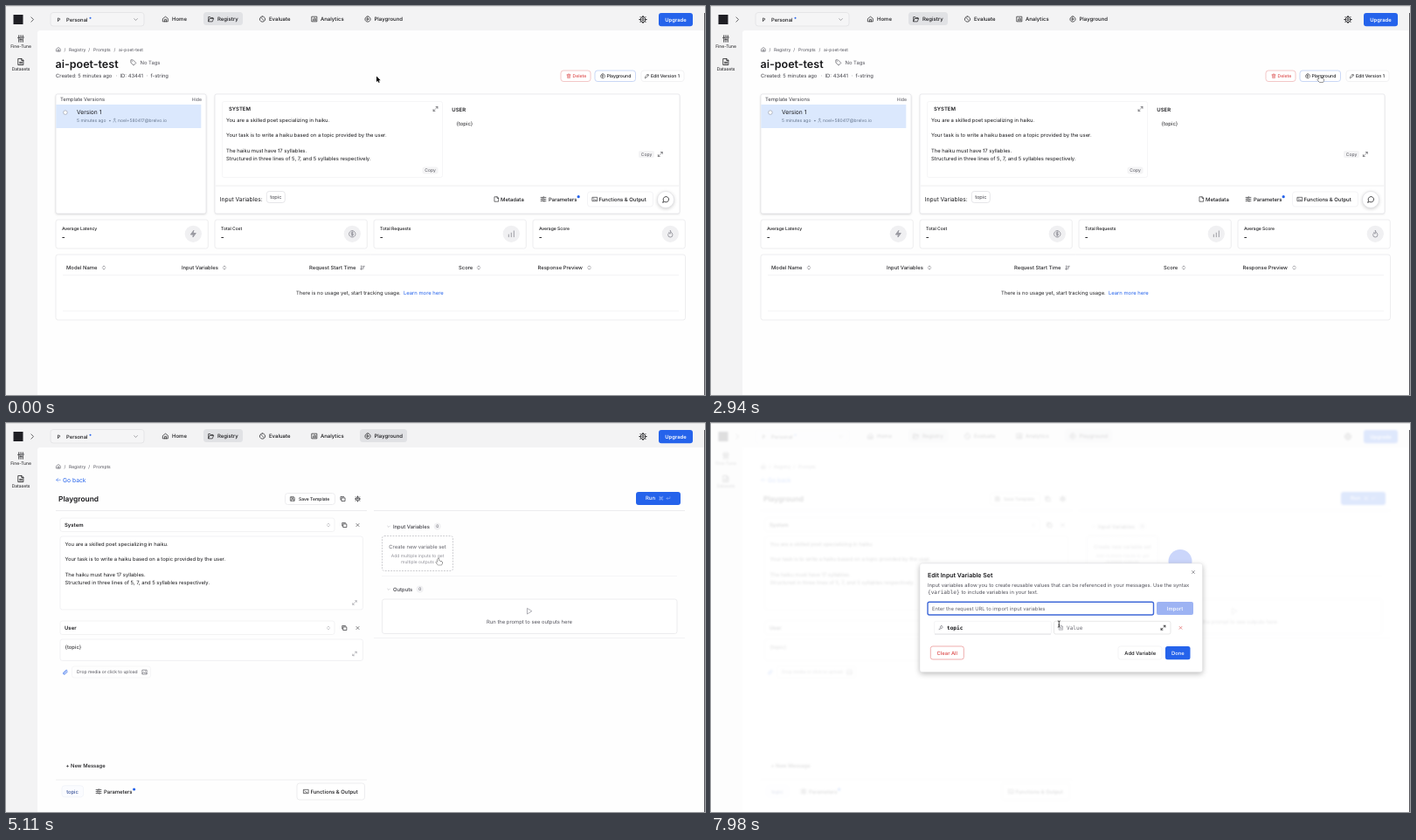
An HTML page with a canvas for the animation above (8000 ms loop, 800 by 446 pixels).

```html
<!DOCTYPE html>
<html lang="en">
<head>
<meta charset="utf-8">
<title>Prompt playground</title>
<style>
html, body { margin: 0; width: 100%; height: 100%; overflow: hidden; background: #fff; }
canvas { display: block; width: 800px; height: 446px; }
</style>
</head>
<body>
<canvas id="stage"></canvas>
<script>
const W = 800, H = 446, LOOP = 8000, STEP = 70;
const INK = '#18181b', GREY = '#52525b', MUTED = '#8b8b93', LINE = '#e6e6e9', BLUE = '#2563eb', RED = '#dc4a4a';
const SANS = 'Inter, "Liberation Sans", sans-serif';
const MONO = '"DejaVu Sans Mono", "Liberation Mono", monospace';

const dpr = window.devicePixelRatio || 1;
const stage = document.getElementById('stage');
const page = document.createElement('canvas');
for (const c of [stage, page]) { c.width = W * dpr; c.height = H * dpr; }
const screen = stage.getContext('2d'), back = page.getContext('2d');
let g = screen;

// Icons on a 24 unit grid
const RING = 'M12 2a10 10 0 1 0 .01 0';
const ICONS = {
  home: 'M3 10l9-7 9 7v11H3zM9 21v-8h6v8',
  folder: 'M3 20V4h6l2 3h9v3M3 20l4-10h15l-4 10z',
  evaluate: RING + 'M7 7l10 10',
  chart: 'M3 3h18v18H3zM8 17v-5M12 17V7M16 17v-7',
  play: RING + 'M10 8l6 4-6 4z',
  gear: 'M12 9a3 3 0 1 0 .01 0M12 4a8 8 0 1 0 .01 0M12 1v3M12 20v3M1 12h3M20 12h3M4 4l2 2M18 18l2 2M20 4l-2 2M6 18l-2 2',
  right: 'M8 3l9 9-9 9',
  down: 'M4 8l8 8 8-8',
  sort: 'M6 9l6-6 6 6M6 15l6 6 6-6',
  sorted: 'M6 3v18M2 17l4 4 4-4M12 5h10M12 11h7M12 17h4',
  tag: 'M2 3v9l10 10 9-9L11 3zM7 8h.01',
  sliders: 'M6 2v5M6 12v10M3 9h6M12 2v11M12 18v4M9 15h6M18 2v4M18 11v11M15 8h6',
  params: 'M2 5h9M16 5h6M13 2v6M2 12h4M11 12h11M8 9v6M2 19h11M18 19h4M15 16v6',
  data: 'M4 2h11l5 5v15H4zM14 2v6h6M8 13h8M8 17h8',
  file: 'M4 2h11l5 5v15H4zM14 2v6h6',
  trash: 'M3 6h18M8 6V2h8v4M5 6l1 16h12l1-16M10 11v6M14 11v6',
  pencil: 'M3 21l2-7L17 2l5 5L10 19zM14 5l5 5',
  person: 'M12 3a4 4 0 1 0 .01 0M5 22c0-10 14-10 14 0',
  expand: 'M14 3h7v7M21 3l-7 7M10 21H3v-7M3 21l7-7',
  output: 'M2 4h20v16H2zM6 9l3 3-3 3M12 15h5',
  chat: 'M3 21l2-5a9 9 0 1 1 4 4z',
  bolt: 'M13 2L4 14h8l-1 8 9-12h-8z',
  coin: RING + 'M15 8H9v4h6v4H9M12 5v14',
  bars: 'M4 21v-7M12 21V9M20 21V3',
  flame: 'M12 2c1 6 7 7 7 13a7 7 0 0 1-14 0c0-4 3-5 3-8 2 1 3 3 3 5 2-3 2-6 1-10z',
  left: 'M22 12H2M10 4l-8 8 8 8',
  save: 'M3 3h14l4 4v14H3zM7 3v6h9V3M7 21v-8h10v8',
  copy: 'M8 8h13v13H8zM4 16H3V3h13v1',
  close: 'M4 4l16 16M20 4L4 20',
  clip: 'M20 11l-9 9c-5 5-12-2-7-7l9-9c4-4 9 1 5 5l-9 9c-2 2-5-1-3-3l8-8',
  image: 'M3 3h18v18H3zM3 17l5-5 5 5 3-3 5 4M15 8h.01',
  triangle: 'M5 2l16 10L5 22z',
  enter: 'M21 4v9H3M9 7l-6 6 6 6',
  command: 'M8 8h8v8H8zM8 8V5a3 3 0 1 0-3 3zM16 8h3a3 3 0 1 0-3-3zM8 16H5a3 3 0 1 0 3 3zM16 16v3a3 3 0 1 0 3-3z',
  key: 'M15 3a6 6 0 1 0 .01 0M11 13l-8 8M6 18l3 3'
};
for (const k in ICONS) ICONS[k] = new Path2D(ICONS[k]);

function icon(name, cx, cy, size = 7, color = INK, weight = 2.2, fill) {
  g.save();
  g.translate(cx - size / 2, cy - size / 2);
  g.scale(size / 24, size / 24);
  g.lineWidth = weight;
  g.lineCap = g.lineJoin = 'round';
  g.strokeStyle = color;
  if (fill) { g.fillStyle = color; g.fill(ICONS[name]); }
  g.stroke(ICONS[name]);
  g.restore();
}

// cy is the middle of the capitals
function text(s, x, cy, size = 5.87, weight = 400, color = INK, align = 'left', family = SANS) {
  g.font = `${weight} ${size}px ${family}`;
  g.textRendering = 'geometricPrecision';
  g.textAlign = align;
  g.fillStyle = color;
  g.fillText(s, x, cy + size * .364);
}

function box(x, y, w, h, r, fill, stroke, lw = .7) {
  g.beginPath();
  g.roundRect(x, y, w, h, r);
  if (fill) { g.fillStyle = fill; g.fill(); }
  if (stroke) { g.strokeStyle = stroke; g.lineWidth = lw; g.stroke(); }
}

function raised(x, y, w, h, r, blur, alpha) {
  g.save();
  g.shadowColor = `rgba(0,0,0,${alpha})`;
  g.shadowBlur = blur * dpr;
  g.shadowOffsetY = dpr;
  box(x, y, w, h, r, '#fff');
  g.restore();
  box(x, y, w, h, r, null, '#dedee2', .6);
}

function rule(x, y, w, color = LINE) {
  g.fillStyle = color;
  g.fillRect(x, y, w, .7);
}

function disc(x, y, r, color) {
  g.beginPath();
  g.arc(x, y, r, 0, 7);
  g.fillStyle = color;
  g.fill();
}

function shell(inPlayground) {
  g.fillStyle = '#f3f3f4';
  g.fillRect(0, 0, W, H);
  box(36, 28, W - 36, H - 28, [3, 0, 0, 0], '#fefefe');

  box(8.5, 10, 11, 11, 0, '#1f1f24');
  icon('right', 30, 15.5, 7);
  box(51, 7.5, 107, 15.5, 3, '#f5f5f6', '#e0e0e3');
  text('P', 58.5, 15.5, 5.87, 500);
  text('Personal', 69, 15.5, 5.87, 500);
  disc(96.5, 13.7, 1, BLUE);
  icon('down', 148.5, 15.5, 5.5, GREY);

  box(226, 7, 45, 15, 3.5, '#e1e2e5');
  if (inPlayground) box(405, 7, 54, 15, 3.5, '#e1e2e5');
  const nav = [['home', 'Home', 182.5, 190], ['folder', 'Registry', 234.5, 242], ['evaluate', 'Evaluate', 293.5, 301],
    ['chart', 'Analytics', 353, 360], ['play', 'Playground', 414, 421.5]];
  for (const [i, label, ix, tx] of nav) {
    icon(i, ix, 15, 7.5);
    text(label, tx, 15, 6, 500);
  }
  icon('gear', 729, 15.5, 9, INK, 2.5);
  box(747, 8, 39, 15.3, 3, BLUE);
  text('Upgrade', 766.5, 15.7, 5.87, 600, '#fff', 'center');

  icon('sliders', 17, 37.5, 9);
  text('Fine-Tune', 17, 45.8, 5.03, 400, INK, 'center');
  icon('data', 17, 64, 8.5);
  text('Datasets', 17, 72.3, 5.03, 400, INK, 'center');

  icon('home', 60, 49.7, 6, GREY);
  const crumbs = [['/', 66.5], ['Registry', 72], ['/', 94.3], ['Prompts', 100]];
  if (!inPlayground) crumbs.push(['/', 123.5], ['ai-poet-test', 129]);
  for (const [s, x] of crumbs) text(s, x, 49.8, 5.03, 400, GREY);
}

const POEM = [['You are a skilled poet specializing in haiku.', 0],
  ['Your task is to write a haiku based on a topic provided by the user.', 17.8],
  ['The haiku must have 17 syllables.', 35.6],
  ['Structured in three lines of 5, 7, and 5 syllables respectively.', 44.5]];
const poem = (x, y) => POEM.forEach(([s, dy]) => text(s, x, y + dy));

function copyChip(x, y) {
  box(x - 9, y - 4, 18, 8, 2, '#f4f4f5');
  text('Copy', x, y, 5.03, 400, GREY, 'center');
}

function registry() {
  shell(false);
  text('ai-poet-test', 56.5, 66.5, 12.5, 600);
  icon('tag', 146, 65, 7.5, GREY);
  text('No Tags', 153.5, 65.2, 5.87, 400, GREY);
  const meta = [['Created: 5 minutes ago', 57], ['·', 125.5], ['ID: 43441', 130.5], ['·', 160.5], ['f-string', 165.5]];
  for (const [s, x] of meta) text(s, x, 80.3, 5.87, 400, '#3f3f46');

  box(635, 74, 34, 12.5, 3, '#fff', '#efb0b0');
  icon('trash', 644, 80.3, 5.5, RED);
  text('Delete', 648.5, 80.3, 5.1, 500, RED);
  box(674, 74, 46.5, 12.5, 3, '#fff', '#b4c8f2');
  icon('play', 683, 80.3, 6);
  text('Playground', 687.5, 80.3, 5.15, 500);
  box(727, 74, 49, 12.5, 3, '#fff', '#ececee');
  icon('pencil', 733.5, 80.3, 5.5);
  text('Edit Version 1', 738, 80.3, 5.15, 500);

  raised(57, 101, 172, 137, 2, 3, .16);
  text('Template Versions', 62, 107, 5.87, 400, '#3f3f46');
  text('Hide', 224, 107, 5.2, 400, GREY, 'right');
  g.fillStyle = '#dbe8fd';
  g.fillRect(57.3, 113, 166, 27);
  box(65.6, 119.8, 4.6, 4.6, 2.3, '#fff', '#9ca3af');
  text('Version 1', 81, 122, 6.7);
  text('5 minutes ago', 81, 131.2, 5.03, 400, '#64748b');
  text('•', 117.6, 131.2, 5.03, 400, '#64748b');
  icon('person', 124.3, 131, 5, '#64748b');
  text('noel+580417@brelvo.io', 128, 131.2, 5.03, 400, '#64748b');

  raised(239, 101, 532, 137, 2, 2.5, .1);
  box(247.5, 109.5, 252, 87, 2, null, '#f2f2f4');
  text('SYSTEM', 255, 117.8, 5.95, 600);
  text('USER', 510.3, 119, 5.95, 600);
  icon('expand', 491.5, 118, 6.5, '#3f3f46');
  icon('expand', 748.8, 170, 6.5, '#3f3f46');
  poem(252, 130.5);
  text('{topic}', 515.5, 134.5);
  copyChip(485.5, 188.5);
  copyChip(733, 170);
  rule(240, 205.7, 530);
  text('Input Variables:', 244.7, 221.7, 6.7);
  box(298.3, 212.5, 21, 13, 3, '#fff', '#dcdce0');
  text('topic', 308.8, 218.7, 5.7, 400, '#3f3f46', 'center');
  icon('file', 561.5, 221.5, 6.5);
  text('Metadata', 566, 221.5, 5.95, 500);
  icon('params', 615, 221.5, 7);
  text('Parameters', 621, 221.5, 5.95, 500);
  disc(655.2, 218.7, 1.6, BLUE);
  box(665.5, 213, 75, 17, 3, null, '#f0f0f2');
  icon('output', 674, 221.5, 6.5);
  text('Functions & Output', 678.5, 221.5, 5.95, 500);
  raised(745.5, 212.5, 19, 19, 9.5, 4, .22);
  icon('chat', 755, 221.8, 8.5);

  const stats = [['Average Latency', 'bolt', 1], ['Total Cost', 'coin'], ['Total Requests', 'bars'], ['Average Score', 'flame']];
  stats.forEach(([label, i, solid], n) => {
    const x = 57 + n * 182;
    box(x, 245, 174.3, 33, 2.5, '#fff', LINE);
    text(label, x + 7, 254.8, 5.03, 500);
    text('-', x + 6.8, 264.8, 8.4, 600);
    disc(x + 157.3, 261.3, 9.6, '#f0f0f2');
    icon(i, x + 157.3, 261.3, 9, '#9a9aa2', 2.6, solid);
  });

  box(57, 285, 720.5, 75, 2.5, '#fff', LINE);
  const cols = [['Model Name', 69, 112], ['Input Variables', 201, 250], ['Request Start Time', 347, 408],
    ['Score', 518, 541], ['Response Preview', 608.5, 667.5]];
  cols.forEach(([label, x, ix], n) => {
    text(label, x, 300, 5.87, 500, '#27272a');
    icon(n === 2 ? 'sorted' : 'sort', ix, 300, 5.8, GREY, 2.4);
  });
  rule(65, 308.3, 705, '#f0f0f2');
  rule(65, 349.5, 705, '#f0f0f2');
  text('There is no usage yet, start tracking usage.', 332, 329, 5.87, 400, '#27272a');
  text('Learn more here', 455, 329, 5.87, 400, BLUE);
}

function message(role, value, y, h) {
  box(62, y - 8, 314, 15.5, 2.5, '#fff', '#eeeef0');
  text(role, 67, y, 5.95, 600);
  icon('sort', 369, y, 5.2, MUTED);
  icon('copy', 387.3, y, 6.8);
  icon('close', 402.5, y, 4.8, INK, 2.6);
  box(62, y + 13, 346.5, h, 2.5, '#fff', '#ececef');
  value(y + 21.5);
  icon('expand', 399, y + 5 + h, 6, MUTED);
}

function section(label, y, badgeX, loaded) {
  icon('down', 438, y + .3, 4, MUTED);
  text(label, 443, y, 5.87, 500, '#3f3f46');
  if (!loaded) return;
  box(badgeX - 4, y - 4, 8, 8, 4, '#f1f1f3');
  text('0', badgeX, y, 4.8, 400, GREY, 'center');
}

function playground(t) {
  const loaded = t >= 3430, hover = t >= 4550;
  shell(true);
  icon('left', 60, 65.3, 5.5, BLUE);
  text('Go back', 65, 65.3, 6.75, 400, BLUE);
  text('Playground', 60, 87, 8.38, 600);
  box(319.5, 80.5, 57, 13, 3, '#fff', LINE);
  icon('save', 328, 87, 6);
  text('Save Template', 335, 87, 5.03, 500);
  icon('copy', 385.5, 87, 6.8);
  icon('gear', 402.5, 87, 6.8);
  box(721, 79, 51, 15, 3, BLUE);
  text('Run', 732, 86.3, 5.95, 500, '#fff');
  icon('command', 749.8, 86.3, 5, '#a9c1fa');
  icon('enter', 758, 86.3, 5, '#a9c1fa');
  rule(57, 100, 356);
  rule(421, 100, 356);

  if (loaded) {
    message('System', y => poem(67.5, y), 117, 84);
    message('User', y => text('{topic}', 67.5, y), 235, 24.5);
    icon('clip', 68, 285.7, 6.5, BLUE);
    box(75.5, 279, 90, 13, 2.5, null, '#f2f2f4');
    text('Drop media or click to upload', 81, 285.6, 5.03, 400, GREY);
    icon('image', 158.7, 285.6, 6.5, GREY);
  }
  text('+ New Message', 68.5, 393, 5.87, 500);
  rule(57, 408.7, 356);
  box(64, 415.8, 24.5, 13, 3, '#fbfcff', '#eef1f8');
  text('topic', 76, 422.5, 5.87, 400, '#1e3a8a', 'center');
  icon('params', 106, 422.5, 7);
  text('Parameters', 112, 422.5, 5.95, 500);
  disc(146.6, 420, 1.6, BLUE);
  box(333, 413, 77.5, 19, 3, '#fff', LINE);
  icon('output', 343.5, 422.5, 6.5);
  text('Functions & Output', 348.5, 422.5, 5.95, 500);

  section('Input Variables', 118.5, 493.7, loaded);
  g.setLineDash([1.8, 1.4]);
  box(430.5, 129.5, 81, 40, 2.5, '#fff', hover ? '#b5b5bb' : '#d9d9dd');
  g.setLineDash([]);
  text('Create new variable set', 471, 141.5, 5.87, 400, hover ? '#66666e' : '#8c8c94', 'center');
  const hint = hover ? '#92929a' : loaded ? '#b2b2b8' : '#c8c8cd';
  text('Add multiple inputs to get', 471, 152.5, 5.03, 400, hint, 'center');
  text('multiple outputs', 471, 159, 5.03, 400, hint, 'center');
  rule(430, 175, 338, '#f3f3f5');
  section('Outputs', 190.5, 473.7, loaded);
  box(430.5, 202, 337.5, 39.5, 2.5, '#fff', LINE);
  icon('triangle', 599, 215.7, 7.5, MUTED);
  text('Run the prompt to see outputs here', 599, 228, 5.87, 400, GREY, 'center');
  rule(421, 246, 356, '#efeff1');
}

function dialog() {
  disc(537, 158.5, 13.5, '#cbd6fb');
  g.save();
  g.shadowColor = 'rgba(0,0,0,.28)';
  g.shadowBlur = 6 * dpr;
  g.shadowOffsetY = 2 * dpr;
  box(239, 161, 323.5, 124.5, 2.5, '#fff');
  g.restore();
  box(239, 161, 323.5, 124.5, 2.5, null, '#e2e2e5', .5);
  icon('close', 552, 171, 4.6, GREY, 2.8);
  text('Edit Input Variable Set', 248, 174.7, 7, 600);
  text('Input variables allow you to create reusable values that can be referenced in your messages. Use the syntax', 248, 185.5, 5.87, 400, GREY);
  text('{variable}', 248, 194, 6.1, 400, GREY, 'left', MONO);
  text('to include variables in your text.', 286.5, 194, 5.87, 400, GREY);
  box(248, 205.2, 258.5, 14.8, 2, '#fff', '#3f68d8', 1.4);
  text('Enter the request URL to import input variables', 253, 212.7, 5.87, 400, '#62626a');
  box(510, 205, 42, 15, 2, '#9db3f3');
  text('Import', 531, 212.7, 5.87, 500, '#fff', 'center');

  box(255.5, 227.3, 134, 14.7, 2, '#fff', '#f1f1f3');
  rule(256, 241.7, 133, '#d5d5d9');
  icon('key', 263, 234.7, 5.8, GREY);
  text('topic', 270, 234.7, 6.1, 700, INK, 'left', MONO);
  box(392.5, 227.3, 133.5, 14.7, 2, '#fff', '#dededf');
  icon('data', 400.6, 234.7, 6, MUTED);
  text('Value', 407, 234.7, 6.1, 400, '#6b6b73', 'left', MONO);
  icon('expand', 517.5, 234.7, 6.5, INK, 2.8);
  icon('close', 537.5, 234.8, 4.4, RED, 3.2);
  box(251.3, 256, 38, 15, 2.5, '#fff', '#e98b8b');
  text('Clear All', 270.3, 263.8, 5.87, 500, RED, 'center');
  box(466, 256, 50, 15, 2.5, '#fff', '#efeff1');
  text('Add Variable', 491.2, 263.8, 5.87, 500, INK, 'center');
  box(520, 256, 28.5, 15.3, 2.5, BLUE);
  text('Done', 534.3, 263.8, 5.87, 500, '#fff', 'center');
}

// time, x, y of the pointer
const PATH = [[0, 424, 80.5], [980, 424, 80.5], [1680, 648, 92], [1890, 648, 92], [2660, 697, 80], [3010, 697, 80],
  [3360, 707, 81.3], [3710, 698, 89], [3850, 693, 93], [4690, 495, 155.5], [6090, 495, 155.5], [6720, 477, 187],
  [6930, 470, 190], [7770, 398.3, 230.5], [LOOP, 398.3, 230.5]];

function pointer(t) {
  const n = PATH.findIndex((p, i) => i && t <= p[0]);
  const [t0, x0, y0] = PATH[n - 1], [t1, x1, y1] = PATH[n];
  const u = (t - t0) / (t1 - t0), e = u * u * (3 - 2 * u);
  return [x0 + (x1 - x0) * e, y0 + (y1 - y0) * e];
}

const ARROW = new Path2D('M0 0V6.6L1.5 5.2 2.6 7.6 3.7 7.1 2.6 4.8H4.7Z');
const HAND = new Path2D('M-.9.6C-.9-.5.6-.5.6.6V2.6L3.4 3.2Q4.3 3.5 4.2 4.4L3.6 7.2H-.7L-2.7 4.6C-3.2 3.7-2.1 3.1-1.5 3.8L-.9 4.4Z');
const BEAM = new Path2D('M-1.5-3.6Q0-3.6 0-2.6 0-3.6 1.5-3.6M0-2.6V2.6M-1.5 3.6Q0 3.6 0 2.6 0 3.6 1.5 3.6M-.8.8H.8');

function cursor(t) {
  const [x, y] = pointer(t);
  const beam = t >= 6370;
  const hand = (t >= 2380 && t < 3080) || (t >= 4550 && !beam);
  g.save();
  g.translate(x, y);
  g.lineJoin = 'round';
  if (beam) {
    g.strokeStyle = '#222';
    g.lineWidth = .8;
    g.stroke(BEAM);
  } else {
    g.strokeStyle = hand ? '#222' : '#fff';
    g.lineWidth = hand ? .9 : 1.2;
    g.fillStyle = hand ? '#fff' : '#000';
    g.stroke(hand ? HAND : ARROW);
    g.fill(hand ? HAND : ARROW);
  }
  g.restore();
}

function draw(t) {
  const fade = Math.max(0, Math.min(1, (t - 6090) / 210));
  g = back;
  g.setTransform(dpr, 0, 0, dpr, 0, 0);
  if (t < 3080) registry(); else playground(t);

  g = screen;
  g.setTransform(dpr, 0, 0, dpr, 0, 0);
  g.filter = fade ? `blur(${.8 * fade * dpr}px)` : 'none';
  g.drawImage(page, 0, 0, W, H);
  g.filter = 'none';
  if (fade) {
    g.fillStyle = `rgba(255,255,255,${.85 * fade})`;
    g.fillRect(0, 0, W, H);
    g.save();
    g.globalAlpha = fade;
    const s = .95 + .05 * fade;
    g.translate(400, 223);
    g.scale(s, s);
    g.translate(-400, -223);
    dialog();
    g.restore();
  }
  g.fillStyle = '#d4d4d6';
  g.fillRect(0, 0, W, .6);
  g.fillStyle = '#55555a';
  g.fillRect(W - 1, 8, 1, H - 8);
  cursor(t);
}

const start = performance.now();
function tick() {
  const t = (performance.now() - start) % LOOP;
  draw(Math.floor(t / STEP) * STEP);
  requestAnimationFrame(tick);
}
tick();
</script>
</body>
</html>
```
